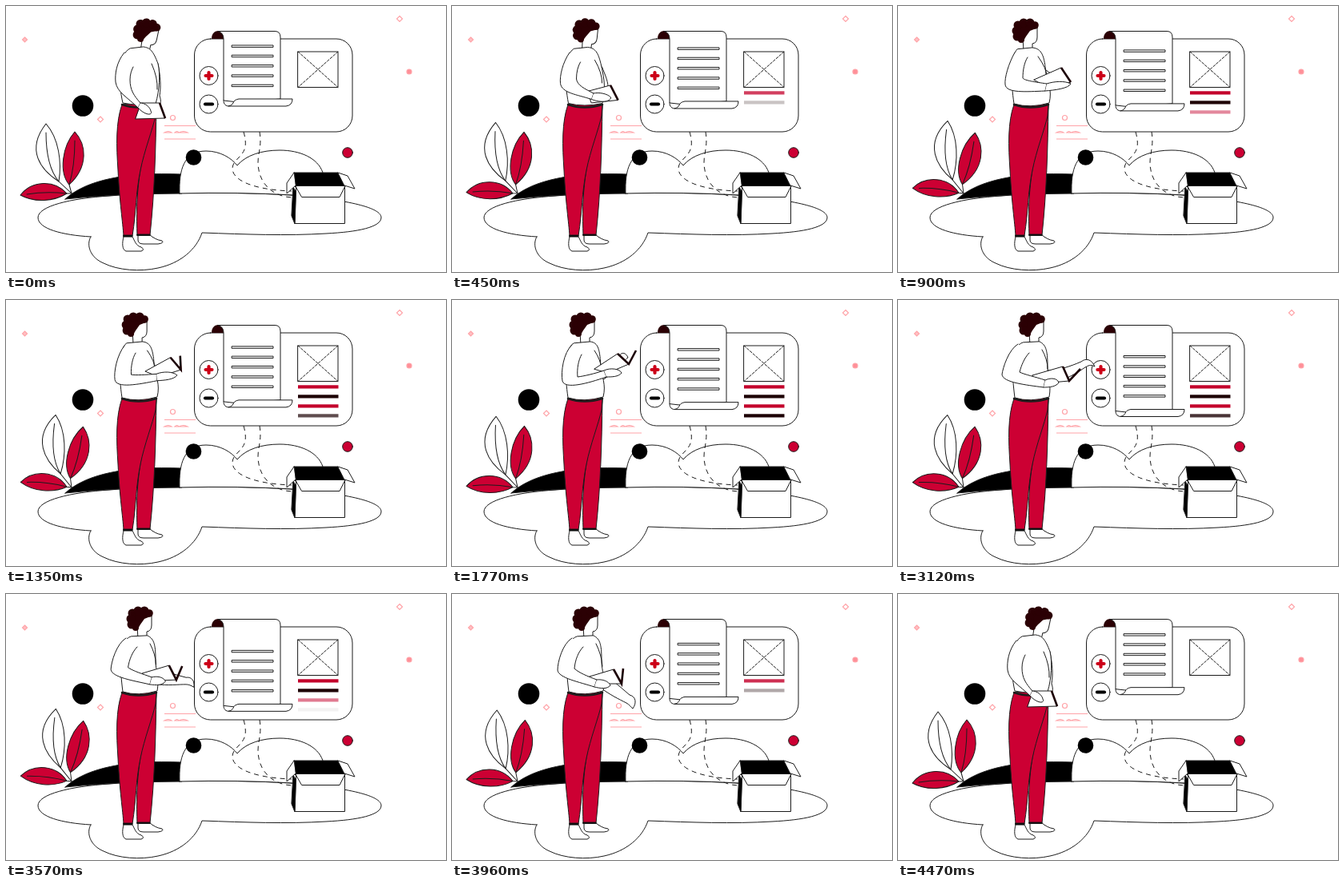
An HTML page for the animation above (4500 ms loop, 550x332 px).

```html
<!DOCTYPE html>
<html lang="en">
<head>
<meta charset="utf-8">
<title>Checklist and parcel</title>
<style>
  html, body { margin: 0; height: 100%; overflow: hidden; background: #fff; }
  svg { display: block; width: 550px; height: 332px; }
  .ink { fill: #fff; stroke: #1c1c1c; stroke-width: 1; stroke-linejoin: round; stroke-linecap: round; }
  .line { fill: none; }
  .red { fill: #cc0033; }
  .black { fill: #000; }
  .pink { fill: none; stroke: #ffa3a8; stroke-width: 1.2; }
  .dash { fill: none; stroke-dasharray: 6 5; stroke-linecap: butt; }
  #edge { fill: none; stroke: #1c0004; stroke-width: 2.6; }
  .hair { fill: #2b0004; }
</style>
</head>
<body>
<svg viewBox="0 0 550 332">
  <!-- scattered marks -->
  <g class="pink">
    <path d="M23.500 39l3 3-3 3-3-3z" fill="#ffc0c4"/>
    <path d="M118 138l3.500 3.500-3.500 3.500-3.500-3.500zM492 12.500l3.500 3.500-3.500 3.500-3.500-3.500z"/>
    <circle cx="208.500" cy="139.500" r="3"/>
    <circle cx="504" cy="82" r="3" fill="#ff8f98"/>
    <path d="M198 149.500h39M198 166h39M198 158q5-3 9 0zM211 158q3-3 5 0q6-3 11 0z"/>
  </g>

  <!-- ground, hill and bush -->
  <path class="ink" d="M106 288C100 298 105 314 122 321C140 330 168 332 190 327C218 321 238 304 245 283C300 285 350 287 400 284C440 282 469 276 469 264C469 252 430 242 355 236C290 232 180 232 130 237C80 240 40 250 40 264C40 278 70 286 106 288Z"/>
  <path class="ink black" d="M74 241C100 217 150 207 220 210V234Q140 234 74 241Z"/>
  <path class="ink" stroke="none" d="M217 234C216 205 222 181 250 181C268 181 282 190 289 199C300 186 320 180 342 180C368 180 390 190 396 208L360 236Q290 232 217 234Z"/>
  <circle class="black" cx="96" cy="124.500" r="13.300"/>
  <circle class="black" cx="234.500" cy="189" r="9.800"/>
  <circle class="ink red" cx="427" cy="183" r="6.300"/>

  <g class="ink">
    <path class="dash" d="M297 157C304 182 294 184 285 196C276 212 298 229 357 231"/>
    <path class="dash" d="M317 157C320 175 315 183 315 195C315 220 332 238 358 239"/>
  </g>

  <!-- parcel -->
  <g class="ink">
    <path class="black" d="M360 208H415L424 226H362ZM359 226L363 233L361 272L357 262Z"/>
    <path d="M363 226H423.500V271.500H361.500Z"/>
    <path d="M362 224.500H424L417 238.500H370Z"/>
    <path d="M360 208L351 221V234L362 224ZM415 208L427 212L436 228L423 224Z"/>
  </g>

  <!-- panel -->
  <rect class="ink" x="235.500" y="41" width="197.500" height="116" rx="20"/>
  <g class="ink">
    <circle cx="253.500" cy="87" r="11.500"/>
    <circle cx="253.500" cy="122.500" r="11.500"/>
  </g>
  <g fill="none" stroke-width="4.200" stroke-linecap="round">
    <path stroke="#cc0018" d="M249.500 87h8M253.500 83v8"/>
    <path stroke="#000" d="M249 122.500h9"/>
  </g>
  <g class="ink">
    <rect x="365" y="57" width="50" height="44.500"/>
    <path stroke-dasharray="3 2" d="M365 57L415 101.500M415 57L365 101.500"/>
  </g>
  <g id="bars"></g>

  <!-- receipt -->
  <path class="hair" d="M257 41C257 34 261 31 266 31L274 34V41Z"/>
  <path class="ink" id="paper"/>
  <g id="rows" class="ink"></g>
  <path class="ink" id="roll" d="M272 118C272 123 275 125 279 125H350Q358 124 358 116H291Q285 117 284 121Q282 125 278 125"/>

  <!-- plant -->
  <g id="plant" class="ink">
    <path d="M66 219C44 205 24 180 50 147C66 165 70 195 66 219Z"/>
    <path class="line" d="M50 158Q50 200 66 219L82 234"/>
    <path class="red" d="M79 223C66 208 70 175 86 157C100 172 104 200 79 223Z"/>
    <path class="line" d="M86 168Q86 200 79 223L82 234"/>
    <path class="red" d="M76 234C60 216 32 218 18 236C36 246 60 244 76 234Z"/>
    <path class="line" d="M26 235Q50 231 76 234H82"/>
  </g>

  <!-- person -->
  <g class="ink">
    <path d="M147 288C145 296 145 304 150 306H169Q174 304 169 301C162 299 161 293 158 288Z"/>
    <path d="M165 287V292Q165 297 172 297H190Q198 296 195 293C188 292 184 289 180 286Z"/>
    <path class="red" d="M188 124C187 180 186 230 180 286H164C162 240 165 190 187 137Z"/>
    <path class="red" d="M145 123C137 145 138 175 140 205C142 245 146 270 147 287H158C163 255 162 235 168 205C173 180 183 155 187 137L188 123Z"/>
    <path class="black" d="M147 286h11v2h-11zM164 285h16v1.500h-16z"/>
    <path class="line" stroke-width="2.600" d="M145 123Q165 130 188 123"/>
  </g>
  <g id="head">
    <path class="ink" d="M164 40L165 56H176V47Q182 46 182 39V27L168 25Z"/>
    <g class="hair" id="curls"><path d="M156 22L178 20L183 27L173 31L168 38L164 45L156 42Z"/></g>
  </g>
  <path class="ink" id="farArm"/>
  <path class="ink" id="torso"/>
  <path class="ink line" id="fold"/>
  <path class="ink" id="tablet"/>
  <path id="edge"/>
  <path class="ink" id="nearArm"/>
  <path class="ink" id="hand"/>
</svg>
<script>
const LOOP = 4500;
const $ = id => document.getElementById(id);
const clamp = x => Math.max(0, Math.min(1, x));
const smooth = x => x * x * (3 - 2 * x);

function add(parent, tag, attrs) {
  const el = document.createElementNS('http://www.w3.org/2000/svg', tag);
  for (const k in attrs) el.setAttribute(k, attrs[k]);
  return $(parent).appendChild(el);
}

const curls = [[158, 24, 5.5], [165, 21, 5.5], [173, 21, 5.5], [179, 24, 4.8], [156, 31, 5.5], [157, 38, 5.5], [162, 42, 4]];
curls.forEach(([cx, cy, r]) => add('curls', 'circle', { cx, cy, r }));

const bars = [0, 1, 2, 3].map(i => add('bars', 'rect', {
  x: 365, y: 106.3 + 12 * i, width: 50.5, height: 4.2, fill: i % 2 ? '#1c0004' : '#c3002b'
}));
for (let i = 0; i < 5; i++) add('rows', 'rect', { x: 282.5, y: 49 + 12.3 * i, width: 51.5, height: 2.4 });

// Body poses: each part keeps one path structure through all of them
const poseTimes = [0, 900, 1770, 2310, 3120, 3960, 4470];
const poses = {
  torso: [
    'M155 53C140 60 140 95 146 121Q165 125 187 122C192 105 193 85 190 72C184 56 180 52 172 51Z',
    'M149 54C140 62 141 95 145 122Q165 128 189 121C193 105 187 95 185 85C183 62 180 53 168 52Z',
    'M152 54C140 60 141 95 145 122Q165 128 189 121C193 105 187 95 186 85C185 62 183 53 173 52Z',
    'M156 53C140 58 142 90 146 122Q165 128 189 121C192 104 187 95 187 85C187 65 186 56 177 52Z',
    'M156 53C140 58 142 90 146 122Q165 128 189 121C192 104 187 95 187 85C187 65 186 56 177 52Z',
    'M156 53C140 58 142 90 146 122Q165 128 189 121C192 104 187 95 187 85C187 65 186 56 177 52Z'
  ],
  fold: [
    'M182 72Q190 90 189 104', 'M175 63Q186 78 186 88', 'M178 63Q186 75 187 86',
    'M180 62Q187 74 187 86', 'M180 62Q187 74 187 86', 'M180 62Q187 76 188 90'
  ],
  farArm: [
    'M190 72C193 88 194 100 192 112C194 118 194 122 190 126C188 126 186 124 186 122C184 110 183 100 182 90',
    'M185 80C190 84 195 86 198 88C204 88 208 92 208 96C204 98 200 98 198 98C194 100 190 102 188 104',
    'M186 84C196 84 202 78 209 70C212 64 218 66 220 72C216 74 216 77 214 79C206 88 200 92 188 100',
    'M186 84C198 86 208 82 219 73C226 66 232 70 236 77C230 78 229 80 226 82C218 90 205 100 188 104',
    'M187 88C200 88 215 83 229 77C235 72 242 74 246 83C240 80 238 82 234 84C225 90 210 100 188 106',
    'M188 100C198 105 208 114 222 126C230 128 231 136 226 143C223 141 222 138 218 136C208 131 198 126 187 118'
  ],
  tablet: [
    'M169 121L192 121L199 140L162 141Z', 'M170 92L204 77L216 95L187 101Z', 'M178 86L207 67L221 80L195 91Z',
    'M173 93L206 83L215 99L184 102Z', 'M168 94L206 83L214 101L180 104Z', 'M172 103L202 94L212 112L184 112Z'
  ],
  edge: [
    'M192 121L199 140L192 121', 'M204 77L216 95L204 77', 'M207 67L221 80L230 63',
    'M206 83L215 99L228 86', 'M206 83L214 101L228 86', 'M202 94L212 112L214 93'
  ],
  nearArm: [
    'M148 58C138 70 136 85 137 95C139 108 152 114 165 127L168 121C160 112 155 105 155 92C155 85 157 80 159 76',
    'M146 58C138 72 133 90 134 98C135 109 160 107 184 106L186 97C172 95 158 93 156 90C156 80 158 70 162 64',
    'M150 56C139 66 136 90 138 101C141 112 170 104 193 96L190 88C178 92 165 95 157 96C156 86 158 75 162 68',
    'M150 55C138 62 131 85 131 93C132 104 160 108 186 110L187 101C172 98 158 95 153 91C154 82 158 72 164 66',
    'M150 55C138 62 131 85 130 93C131 103 160 106 182 109L184 100C172 96 158 93 152 90C154 82 158 72 164 66',
    'M150 55C138 62 132 85 132 95C133 105 160 110 178 116L181 107C170 103 158 98 153 93C154 82 158 72 164 66'
  ],
  hand: [
    'M168 121C174 121 180 126 181 131C184 137 174 137 165 127',
    'M186 97C195 94 208 93 216 97C213 103 196 105 184 106',
    'M190 88C198 84 210 86 212 91C208 96 200 96 193 96',
    'M187 101C194 97 203 97 205 104C202 109 193 109 186 110',
    'M184 100C190 97 199 97 201 103C198 108 190 109 182 109',
    'M181 107C188 106 196 109 198 114C194 119 186 118 178 116'
  ],
  head: [
    'translate(5 0) rotate(12 168 47)', 'translate(-8 0) rotate(0 168 47)', 'translate(-4 0) rotate(0 168 47)',
    'translate(0 0) rotate(0 168 47)', 'translate(0 0) rotate(0 168 47)', 'translate(0 0) rotate(0 168 47)'
  ]
};

function blend(a, b, k) {
  const to = b.match(/-?[\d.]+/g);
  let i = 0;
  return a.replace(/-?[\d.]+/g, n => (+n + (to[i++] - n) * k).toFixed(2));
}

function drawPerson(t) {
  let i = 0;
  while (i < 5 && t >= poseTimes[i + 1]) i++;
  const k = smooth(clamp((t - poseTimes[i]) / (poseTimes[i + 1] - poseTimes[i])));
  for (const id in poses) {
    const list = poses[id];
    $(id).setAttribute(id === 'head' ? 'transform' : 'd', blend(list[i], list[(i + 1) % 6], k));
  }
}

function drawReceipt(t) {
  const drop = t < 3500 ? 23 * t / 3500 : 23 * (LOOP - t) / 1000;
  const shift = `translate(0 ${drop})`;
  $('paper').setAttribute('d', `M265 31.500H336Q343 31.500 343 39V${116 + drop}L290 ${120 + drop}L272 ${118 + drop}V41Q272 33 265 31.500Z`);
  $('rows').setAttribute('transform', shift);
  $('roll').setAttribute('transform', shift);
}

function draw(t) {
  drawPerson(t);
  drawReceipt(t);
  const sway = 4.3 * (1 - Math.cos(2 * Math.PI * t / 2250));
  $('plant').setAttribute('transform', `rotate(${sway} 82 234)`);
  bars.forEach((bar, i) => {
    const shown = clamp((t - 310 * i) / 600);
    const hidden = clamp((t - 3850 + 283 * i) / 600);
    bar.setAttribute('opacity', Math.min(shown, 1 - hidden));
  });
}

function tick() {
  draw(performance.now() % LOOP);
  requestAnimationFrame(tick);
}
tick();
</script>
</body>
</html>
```
